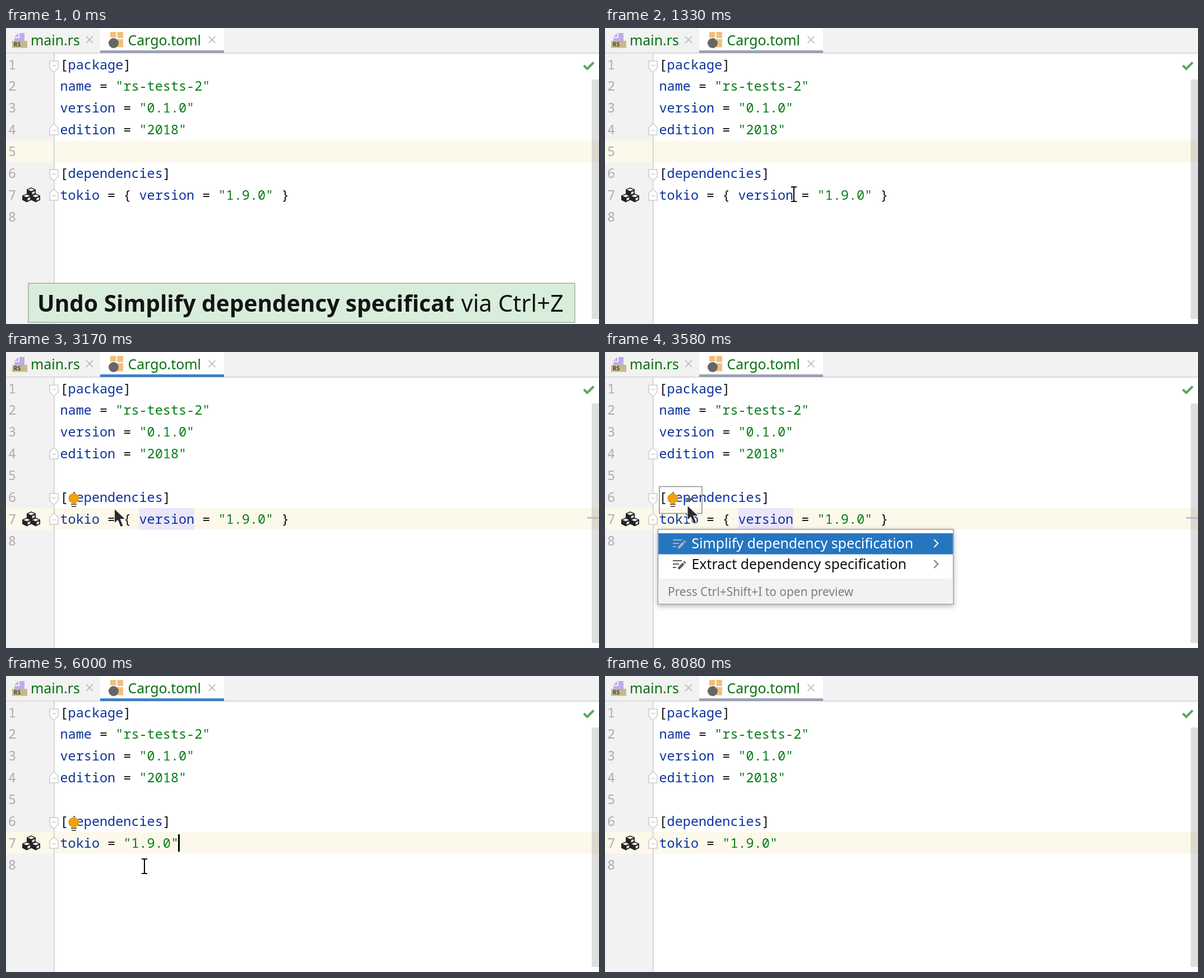
These frames come from a looping animation (1058x529 px, 8160 ms). An HTML page:

```html
<!DOCTYPE html>
<html lang="en">
<head>
<meta charset="utf-8">
<title>Simplify dependency</title>
<style>
  html, body { margin: 0; width: 100%; height: 100%; overflow: hidden; background: #fff; }
  svg { display: block; width: 1058px; height: 529px; }
  text { white-space: pre; font-family: "Noto Sans", "Open Sans", sans-serif; }
  .code text { font: 23.5px "Noto Sans Mono", "DejaVu Sans Mono", monospace; fill: #111; }
  .code .key { fill: #0c339c; }
  .code .str { fill: #067d17; }
  .code .num { fill: #adadad; }
  .ui { font-size: 24.9px; }
  .tab { fill: #0a7010; }
  .line { fill: none; stroke-width: 2; }
  .fold { fill: #fff; stroke: #cdcdcd; stroke-width: 1.6; }
  .close { stroke: #b4b4b4; stroke-width: 1.6; }
  #menu .box { filter: drop-shadow(0 3px 5px rgba(0, 0, 0, .28)); }
  .halo { fill: none; stroke: #fff; stroke-width: 4.5; }
</style>
</head>
<body>
<svg viewBox="0 0 1058 529">
  <defs>
    <path id="cross" d="M-6-6 6 6M6-6-6 6"/>
    <g id="foldStart"><path class="fold" d="M78-7h15v13l-7.5 7-7.5-7z"/><path class="fold" d="M82 1h7"/></g>
    <g id="foldEnd"><path class="fold" d="M78 9h15v-13l-7.5-7-7.5 7z"/><path class="fold" d="M82 1h7"/></g>
    <g id="cube">
      <path d="M0-7.5 8-4v8L0 8l-8-4v-8z" fill="#232323"/>
      <path d="M0-5.8 5.8-3.4 0-1-5.8-3.4z" fill="#f2f2f2"/>
      <path d="M1.6 1 6.2-1v3.800L1.6 5z" fill="#f2f2f2"/>
    </g>
    <g id="edit" class="line">
      <path d="M0-6h16M0 0h11M0 6h6"/>
      <path d="M10 8.5 19-1" stroke-width="4.5"/><path d="M20-2l2-2" stroke-width="4.5"/>
    </g>
    <path id="chevron" class="line" d="M-4-7 3 0-4 7"/>
  </defs>

  <!-- tab bar and gutter -->
  <rect width="1058" height="45" fill="#f2f2f2"/>
  <rect y="44" width="1058" height="1.6" fill="#d1d1d1"/>
  <rect y="45.6" width="85" height="484" fill="#f2f2f2"/>
  <rect x="168" width="221" height="45.6" fill="#fff"/>
  <rect id="underline" x="168" y="40" width="221" height="5"/>

  <path d="M15 16l7-7v7zM24 9h9v15H15v-6h9z" fill="#b9aeea"/>
  <rect x="11" y="23" width="27" height="12.5" fill="#c8b98a"/>
  <text x="13.5" y="33.2" font-size="10.5" font-weight="700" fill="#4c442c">RS</text>
  <text class="ui tab" x="44" y="31">main.rs</text>
  <use href="#cross" class="close" x="149" y="21"/>

  <path d="M186 7h10.5v10h-10.5zM198.5 7h10.5v11h-10.5zM198.5 20h10.5v14.5h-10.5z" fill="#efc07a"/>
  <circle cx="192" cy="27" r="9" fill="#666"/>
  <text class="ui tab" x="217.5" y="31">Cargo.toml</text>
  <use href="#cross" class="close" x="367.5" y="21"/>

  <!-- editor -->
  <rect id="row" width="1058" height="38.5" fill="#fcf8ea"/>
  <rect id="match" x="237.5" y="279" width="98.5" height="38.5" fill="#ebe6f9"/>
  <rect x="85" y="45.6" width="1.6" height="484" fill="#cfcfcf"/>
  <g class="code" id="code"></g>
  <use href="#foldStart" y="66"/><use href="#foldEnd" y="182"/>
  <use href="#foldStart" y="260"/><use href="#foldEnd" y="299"/>
  <use href="#cube" x="45" y="292.5"/><use href="#cube" x="37" y="303.5"/><use href="#cube" x="53" y="303.5"/>
  <path d="M1031 67l6 6 11.5-11.5" fill="none" stroke="#59a65d" stroke-width="4"/>
  <rect x="1045" y="92" width="13" height="428" fill="#000" opacity=".13"/>
  <rect id="stripe" x="1037" y="295" width="21" height="2.6" fill="#b9b0e6"/>
  <rect id="caret" y="283" width="3" height="31" fill="#000"/>

  <g id="bulb">
    <circle cx="121" cy="261.5" r="9.3" fill="#eea10b"/>
    <path class="line" d="M116 272h10M117 276h8" stroke="#555"/>
  </g>
  <g id="bulbBox">
    <rect x="97" y="240.5" width="76" height="48" fill="none" stroke="#9a9a9a" stroke-width="1.7"/>
    <path d="M142 261h16l-8 8z" fill="#666"/>
  </g>

  <g id="menu">
    <rect class="box" x="94.5" y="317" width="527" height="133.5" fill="#fff" stroke="#a8a8a8" stroke-width="1.8"/>
    <rect x="95.3" y="324" width="525.4" height="37.5" fill="#2675bf"/>
    <rect x="95.3" y="405" width="525.4" height="44.7" fill="#f2f2f2"/>
    <g stroke="#adb3b8"><use href="#edit" x="121" y="342"/></g>
    <g stroke="#5a5a5a"><use href="#edit" x="121" y="379"/></g>
    <text class="ui" x="154.5" y="351" fill="#fff">Simplify dependency specification</text>
    <text class="ui" x="154.5" y="388" fill="#111">Extract dependency specification</text>
    <use href="#chevron" x="591" y="342" stroke="#fff"/>
    <use href="#chevron" x="591" y="379" stroke="#7a7a7a"/>
    <text x="112" y="435.5" font-size="20.9" fill="#7d7d7d">Press Ctrl+Shift+I to open preview</text>
  </g>

  <g id="banner" fill="#141414">
    <rect x="39.8" y="456.2" width="975" height="70" fill="#d9eddb" stroke="#a9b5aa" stroke-width="1.7"/>
    <text x="56" y="507" font-size="40.6" font-weight="700">Undo Simplify dependency specificat</text>
    <text x="812" y="507" font-size="41.6">via Ctrl+Z</text>
  </g>

  <g id="pointer">
    <g id="arrow"><path d="M0 0v27l6-6 5 12 5-2-5-12h9z" fill="#2b2b2b" stroke="#fff" stroke-width="1.2"/></g>
    <g id="beam"></g>
    <g id="hand">
      <path d="M-3 0a3 3 0 0 1 6 0v9l11 3q6 2 5 7l-2 7h-15l-8-10q-3-4 0-5 2-1 4 2z" fill="#fff" stroke="#222" stroke-width="2"/>
      <path d="M8 11v5M13 12.5v4.5" stroke="#222" stroke-width="1.6"/>
    </g>
  </g>
</svg>

<script>
const LOOP = 8160, FRAME = 250 / 3;
const CODE_X = 96.5, BASE = 73.6, PITCH = 38.85;
const $ = id => document.getElementById(id);
const show = (id, on) => $(id).setAttribute('visibility', on ? 'visible' : 'hidden');
const within = (t, spans) => spans.some(([a, b]) => t >= a && t < b);

const LINES = [
  '[package]', 'name = "rs-tests-2"', 'version = "0.1.0"', 'edition = "2018"',
  '', '[dependencies]', 'tokio = { version = "1.9.0" }', ''
];
const SHORT = 'tokio = "1.9.0"';

const paint = line => line.replace(/"[^"]*"|[a-z]+/g, s =>
  `<tspan class="${s[0] === '"' ? 'str' : 'key'}">${s}</tspan>`);
const baseline = i => BASE + PITCH * i;
const codeLine = (line, i, id = '') =>
  `<text ${id && `id="${id}"`} x="${CODE_X}" y="${baseline(i)}">${paint(line)}</text>`;

$('code').innerHTML = LINES.map((line, i) =>
  `<text class="num" x="4" y="${baseline(i)}">${i + 1}</text>` +
  codeLine(line, i, i === 6 ? 'long' : '')).join('') + codeLine(SHORT, 6, 'short');

const BEAM = 'M-5-13h3.5q1.5 0 1.5 1.5v23q0 1.5-1.5 1.5h-3.5M5-13h-3.5q-1.5 0-1.5 1.5v23q0 1.5 1.5 1.5h3.5';
$('beam').innerHTML = `<path class="halo" d="${BEAM}"/><path class="line" stroke="#000" d="${BEAM}"/>`;

// time, x, y, shape until the next entry
const PATH = [
  [0, 275, 0, ''], [165, 275, 12, 'arrow'], [330, 267, 68, 'beam'], [500, 253, 66, 'beam'],
  [660, 222, 40, 'arrow'], [830, 192, 26, 'arrow'], [915, 225, 70, 'beam'],
  [1000, 285, 180, 'beam'], [1085, 338, 280, 'beam'], [1165, 345, 297, 'beam'],
  [1255, 345, 297, 'beam'], [1330, 337, 297, 'beam'], [2840, 337, 297, 'beam'],
  [3165, 195, 280, 'arrow'], [3330, 147, 274, 'arrow'], [3675, 147, 274, 'arrow'],
  [4080, 215, 325, 'hand'], [4415, 247, 340, 'hand'], [5330, 247, 340, 'beam'],
  [6925, 247, 340, 'beam'], [7170, 92, 383, 'beam'], [7245, 92, 383, '']
];

function movePointer(t) {
  const i = PATH.findLastIndex(p => p[0] <= t);
  const [t0, x0, y0, shape] = PATH[i];
  const [t1, x1, y1] = PATH[i + 1] || [LOOP, x0, y0];
  const f = (t - t0) / (t1 - t0);
  $('pointer').setAttribute('transform', `translate(${x0 + (x1 - x0) * f} ${y0 + (y1 - y0) * f})`);
  for (const id of ['arrow', 'beam', 'hand']) show(id, id === shape);
}

const CLICK = 1500, MENU = 3420, PICK = 5250, EDIT = 5330, BLUR = 8000;
const CARET = [[CLICK, 2000], [2500, 3000], [EDIT, 6330], [6830, 7250], [7750, BLUR]];

function render(ms) {
  const t = Math.floor((ms + 4) / FRAME) * FRAME + 4;
  const edited = t >= EDIT;
  const focused = within(t, [[CLICK, MENU], [PICK, BLUR]]);

  $('underline').setAttribute('fill', focused ? '#3f7fc4' : '#9ca0b4');
  $('row').setAttribute('y', t < CLICK ? 201.5 : 279);
  show('match', within(t, [[CLICK, EDIT]]));
  show('stripe', within(t, [[CLICK, EDIT]]));
  show('long', !edited);
  show('short', edited);

  show('caret', within(t, CARET));
  $('caret').setAttribute('x', edited ? 307 : 335.5);

  show('bulb', within(t, [[2500, EDIT], [6000, BLUR]]));
  show('bulbBox', within(t, [[3250, PICK]]));
  show('menu', within(t, [[MENU, PICK]]));
  $('banner').setAttribute('opacity', Math.max(0, 1 - Math.floor(t / FRAME) / 3));
  movePointer(t);
}

function tick() {
  render(performance.now() % LOOP);
  requestAnimationFrame(tick);
}
tick();
</script>
</body>
</html>
```
